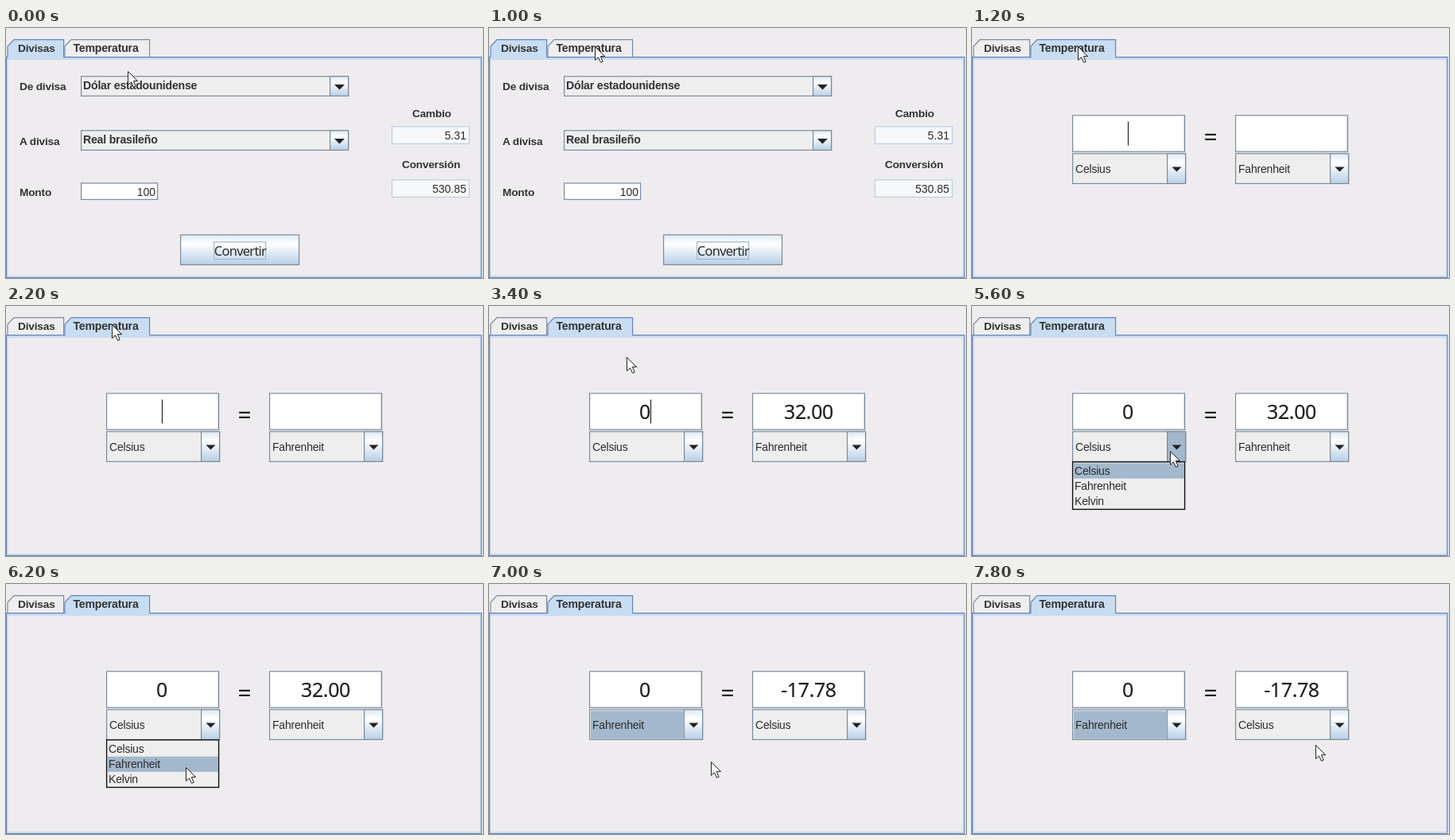
An HTML page that plays this animation: 600x314 px, repeating every 8000 ms.

```html
<!DOCTYPE html>
<html lang="es">
<head>
<meta charset="utf-8">
<style>
html, body { margin: 0; width: 100%; height: 100%; overflow: hidden; background: #eeecee; }
svg { display: block; width: 600px; height: 314px; }
text { font: 14px "Liberation Sans", sans-serif; letter-spacing: -.2px; fill: #2b2b2b; white-space: pre; }
.bold { font-weight: bold; font-size: 13.7px; fill: #333; }
.wide { font-size: 14.1px; }
.num { text-anchor: end; letter-spacing: 0; }
.big { font: 25px "Noto Sans", sans-serif; letter-spacing: -.4px; text-anchor: middle; fill: #222; stroke: #222; stroke-width: .2; }
.equals { font-size: 30px; stroke: none; }
.button { font: 16.5px "Noto Sans", sans-serif; letter-spacing: -.75px; text-anchor: middle; }
.line, .edge, .pale, .focus, .frame { stroke-width: 1.17; }
.line { stroke: #7a8a99; }
.edge { stroke: #6382bf; fill: none; }
.pale { stroke: #b8cfe5; }
.focus { stroke: #a3b8cc; }
.frame { stroke: #111; stroke-width: 1.4; }
</style>
</head>
<body>
<svg id="stage" viewBox="0 0 600 314"></svg>
<script>
const LOOP = 8000, STEP = 200;
const SWITCH = 1200, TYPE = 3400, OPEN = 5400, HOVER = 6000, PICK = 6600;
const SELECT = '#a3b8cc', PANEL = '#eeeeee', TAB = '#c8ddf2';

const ocean = `<defs><linearGradient id="ocean" x2="0" y2="1">
  <stop stop-color="#dde8f3"/><stop offset=".3" stop-color="#fff"/>
  <stop offset=".5" stop-color="#eaf1f8"/><stop offset="1" stop-color="#b8cfe5"/>
</linearGradient></defs>`;

const text = (x, y, s, cls = '') => `<text x="${x}" y="${y}" class="${cls}">${s}</text>`;
const block = (x, y, w, h, fill, cls = '') =>
  `<rect x="${x}" y="${y}" width="${w}" height="${h}" fill="${fill}" class="${cls}"/>`;
const rect = (x, y, w, h, fill, cls = 'line') => block(x - .4, y - .2, w, h + .6, fill, cls);
const group = (id, body) => `<g id="${id}">${body}</g>`;

const tab = (x, right, fill, cls) =>
  `<path d="M${x} 37V23L${x + 8} 14.7H${right - .4}V37" style="fill:${fill}" class="${cls}"/>`;

function tabs(active) {
  const ends = [[2, 73], [74, 181]];
  const [from, to] = ends[active];
  return ends.map(([x, r], i) => tab(x, r, i === active ? TAB : PANEL, i === active ? 'edge' : 'line')).join('') +
    block(1, 36.8, 597, 3.2, TAB) + block(1, 37, 1.4, 277, TAB) +
    block(595.8, 37, 2.2, 277, TAB) + block(1, 311, 597, 2.2, TAB) +
    `<path d="M${from} 36.7H.5V313.6H598V36.7H${to - .4}" class="edge"/>` +
    text(15, 30, 'Divisas', 'bold') + text(84.4, 30, 'Temperatura', 'bold wide');
}

function arrow(x, y, w, h, half, fill = 'url(#ocean)') {
  const cx = x + w / 2, top = y + h / 2 - 2;
  return rect(x, y, w, h, fill) +
    `<path d="M${cx - half} ${top}h${half * 2}l${-half} ${half}z" fill="#222"/>`;
}

const moneyCombo = (y, s) => rect(95, y, 336, 24, PANEL) + arrow(408, y, 23, 24, 6.5) +
  text(97, y + 16, s, 'bold wide');
const resultBox = (y, s) => rect(486, y, 97, 21, '#f7f8fa', 'pale') + text(579, y + 16, s, 'num');
const unitField = x => rect(x, 110, 141, 45, '#fff') +
  `<path d="M${x + .5} 154H${x + 139.5}V111" fill="none" stroke="#d5dde5"/>`;
const unitCombo = x => rect(x, 158, 142, 37, PANEL) + arrow(x + 119, 158, 23, 37, 6);

const money = tabs(0) +
  text(17, 78, 'De divisa', 'bold') + text(17, 147, 'A divisa', 'bold') + text(17, 211, 'Monto', 'bold') +
  moneyCombo(61, 'Dólar estadounidense') + moneyCombo(129, 'Real brasileño') +
  rect(95, 195, 96, 20, '#fff') + text(188, 211, '100', 'num') +
  text(511, 112, 'Cambio', 'bold') + text(498, 176, 'Conversión', 'bold') +
  resultBox(124, '5.31') + resultBox(191, '530.85') +
  rect(220, 260, 149, 37, 'url(#ocean)') +
  rect(262, 269, 65, 21, 'none', 'focus') + text(294.5, 286, 'Convertir', 'button');

const heat = tabs(1) + unitField(127) + unitField(332) + unitCombo(127) + unitCombo(332) +
  group('focus', block(128, 159.5, 117.5, 35, SELECT)) +
  group('pressed', arrow(246, 158, 23, 37, 6, SELECT)) +
  text(300, 148, '=', 'big equals') +
  '<text id="amount" class="big" x="196" y="142">0</text>' +
  '<text id="result" class="big" x="402" y="142"></text>' +
  '<path id="caret" d="M0 117.5V147.5" stroke="#222" stroke-width="1.2"/>' +
  '<text id="left" x="130" y="182"></text><text id="right" x="335" y="182"></text>' +
  group('popup', rect(127, 196, 141, 59, PANEL, 'frame') +
    `<rect id="row" x="128" width="139" height="19.2" fill="${SELECT}"/>` +
    ['Celsius', 'Fahrenheit', 'Kelvin'].map((s, i) => text(129, 212 + i * 19, s)).join(''));

document.getElementById('stage').innerHTML = ocean + group('money', money) + group('heat', heat) +
  '<path id="pointer" d="M.5 .5V17.5L4.5 13.8 7.5 20.3 10.2 19.2 7.3 12.6H12.6Z" fill="#fff" stroke="#222"/>';

const $ = id => document.getElementById(id);
const show = (id, on) => $(id).setAttribute('visibility', on ? 'inherit' : 'hidden');

// Pointer stops: time, x, y
const path = [
  [0, 153, 54], [800, 133, 23], [2600, 133, 23], [3200, 173, 64], [4700, 173, 64],
  [5300, 249, 182], [5700, 249, 182], [6200, 226, 230], [6700, 226, 230],
  [7600, 432, 202], [LOOP, 432, 202]
];

function pointerAt(t) {
  const i = path.findIndex(p => p[0] > t);
  const [t0, x0, y0] = path[i - 1], [t1, x1, y1] = path[i];
  const u = (t - t0) / (t1 - t0), e = u * u * (3 - 2 * u);
  return [x0 + (x1 - x0) * e, y0 + (y1 - y0) * e];
}

function draw(t) {
  const typed = t >= TYPE, picked = t >= PICK, open = t >= OPEN && !picked;
  const heated = t >= SWITCH, blinkStart = typed ? TYPE : SWITCH;
  show('money', !heated);
  show('heat', heated);
  show('amount', typed);
  show('focus', picked);
  show('pressed', open && t < HOVER);
  show('popup', open);
  show('caret', heated && t < OPEN && (t - blinkStart) % 1000 < 500);
  // 'inherit' keeps the parts above hidden along with their tab
  $('result').textContent = picked ? '-17.78' : typed ? '32.00' : '';
  $('left').textContent = picked ? 'Fahrenheit' : 'Celsius';
  $('right').textContent = picked ? 'Celsius' : 'Fahrenheit';
  $('row').setAttribute('y', t < HOVER ? 197.5 : 216.7);
  $('caret').setAttribute('transform', `translate(${typed ? 203.5 : 196.5})`);
  $('pointer').setAttribute('transform', `translate(${pointerAt(t).map(Math.round)})`);
}

function tick() {
  const t = performance.now() % LOOP;
  draw(Math.floor(t / STEP) * STEP);
  requestAnimationFrame(tick);
}
tick();
</script>
</body>
</html>
```
